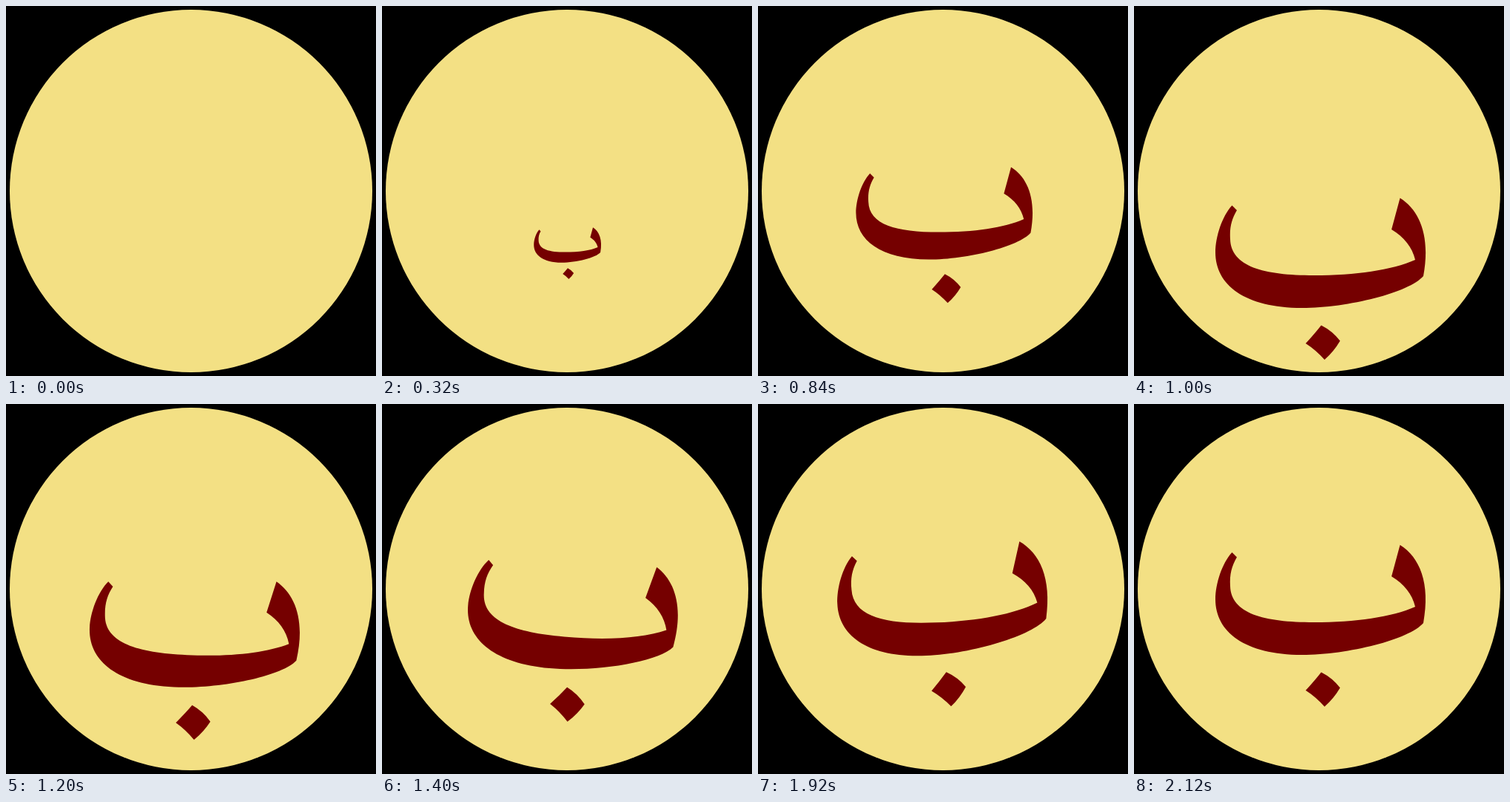
An HTML page for the animation above (2.8 s loop, 500 px wide and 500 px high).

```html
<!DOCTYPE html>
<html lang="ar">
<head>
<meta charset="utf-8">
<title>Bouncing letter</title>
<style>
  html, body { margin: 0; height: 100%; overflow: hidden; background: #000; }
  svg { display: block; width: 100vw; height: 100vh; }
</style>
</head>
<body>
<svg viewBox="0 0 500 500">
  <circle cx="250" cy="250" r="245" fill="#f3e084"/>
  <g id="letter" fill="#750000">
    <path d="M132.5 200.5L139 207C132 219 129 230 130 246C131 283 175 295 243 295
      C300 295 348 288 380 274C376 257 365 243 348 233L359.5 190.5
      C386 207 401 242 391 296C372 318 290 339 227 339
      C150 339 110 308 110 264C110 243 119 215 132.5 200.5Z"/>
    <path d="M253 362.5Q268 370 278.5 383.5Q270 398 257.5 409Q246 396 232 387Q244 374 253 362.5Z"/>
  </g>
</svg>
<script>
const LOOP = 2800, STEP = 40, END = 2120;
const letter = document.getElementById('letter');
const pivot = { x: 250, y: 330 };

// [time, value] pairs
const drop = [[0, -80], [520, 60], [840, 5], [1000, 69], [1400, 20], [1720, 0], [END, 0]];
const tilt = [[0, 0], [1000, 0], [1400, 5], [1720, -5], [END, 0]];

const smooth = u => u * u * (3 - 2 * u);

function at(keys, t) {
  const i = Math.max(1, keys.findIndex(k => t <= k[0]));
  const [t0, a] = keys[i - 1], [t1, b] = keys[i];
  return a + (b - a) * smooth((t - t0) / (t1 - t0));
}

function draw(now) {
  const t = Math.min(END, Math.floor(now % LOOP / STEP) * STEP);
  const scale = Math.min(1, t / 1000);
  letter.setAttribute('transform',
    `translate(${pivot.x} ${pivot.y + at(drop, t)}) rotate(${at(tilt, t)}) ` +
    `scale(${scale}) translate(${-pivot.x} ${-pivot.y})`);
}

const start = performance.now();
function tick() {
  draw(performance.now() - start);
  requestAnimationFrame(tick);
}
tick();
</script>
</body>
</html>
```
